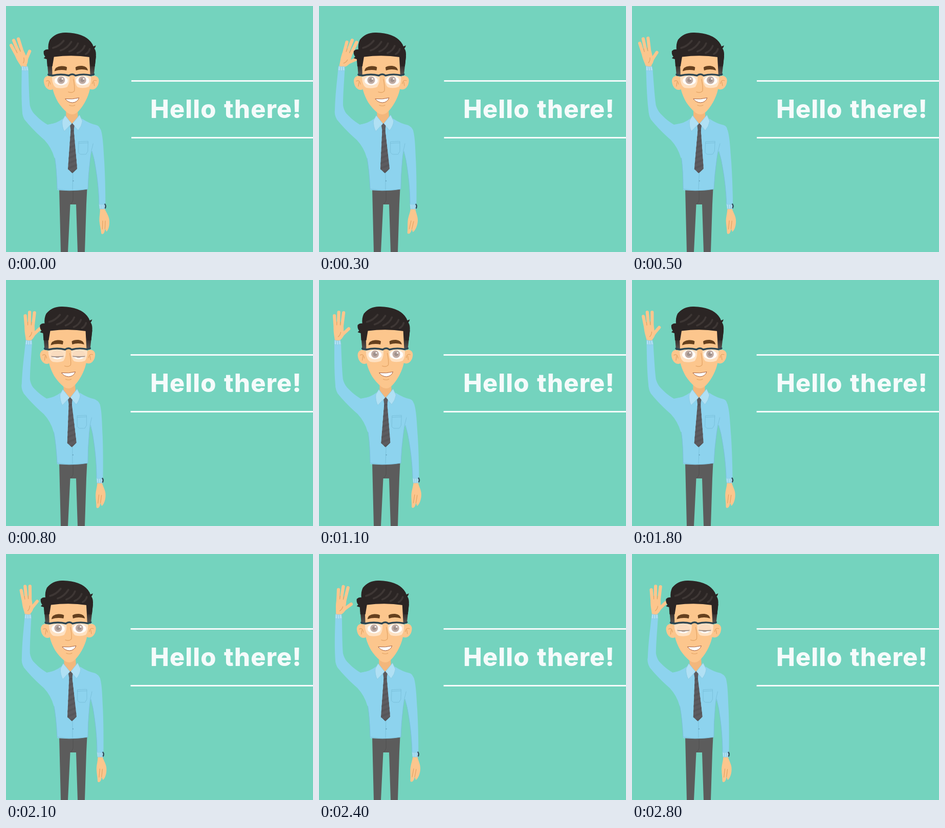
Recreate the animation shown at these times as an HTML page. Size 600 by 481 pixels, loop 2900 ms.

```html
<!DOCTYPE html>
<html lang="en">
<head>
<meta charset="utf-8">
<title>Hello there!</title>
<style>
  html, body { margin: 0; width: 100%; height: 100%; overflow: hidden; background: #74d3be; }
  svg { display: block; width: 600px; height: 481px; }
  text { font: 800 49px Inter, "Open Sans", sans-serif; letter-spacing: 1.1px; fill: #f5fbfb; }
  .skin { fill: #fcc68d; }
  .skinLine { fill: none; stroke: #e2a263; stroke-width: 1.2; stroke-linecap: round; stroke-linejoin: round; }
  .finger { fill: none; stroke: #fcc68d; stroke-width: 6.2; stroke-linecap: round; }
  .shirt { fill: #8dd3ee; }
  .light { fill: #b0e0f4; stroke: #88c9e2; stroke-width: .8; stroke-linejoin: round; }
  .seam { fill: none; stroke: #79bfda; stroke-width: .9; stroke-linecap: round; }
  .hair { fill: #2b2524; }
  .shine { fill: none; stroke: #3e3735; stroke-width: 3.6; stroke-linecap: round; }
  .frame { fill: none; stroke: #2d4652; stroke-width: 3.4; stroke-linecap: round; stroke-linejoin: round; }
</style>
</head>
<body>
<svg viewBox="0 0 600 481">
  <defs>
    <linearGradient id="side" x1="0" y1="0" x2="0" y2="1">
      <stop offset=".35" stop-color="#2b2524"/>
      <stop offset="1" stop-color="#5c5753"/>
    </linearGradient>
    <clipPath id="tieClip"><path id="tieShape" d="M122 234 L126 229 L130.500 234 L129.500 243 L138 318 L129 327 L120 319 L123.500 243 Z"/></clipPath>
    <clipPath id="eyes"><ellipse cx="102" cy="146" rx="13" ry="9"/><ellipse cx="144" cy="146" rx="13" ry="9"/></clipPath>
  </defs>
  <rect width="600" height="481" fill="#74d3be"/>

  <path id="rules" stroke="#f5fbfb" stroke-width="3"/>
  <text x="282" y="219">Hello</text>
  <text x="426" y="219">there!</text>

  <path fill="#5c5c5c" d="M104 357 H158.500 L157 388 L154 481 H140 L137 388 H125.500 L121 481 H107 Z"/>
  <path fill="none" stroke="#505050" d="M131 362 V380 Q130 385 126 387"/>

  <g id="lowArm">
    <g id="lowHand">
      <path class="skin" d="M179.500 394 L188 394 C189 403 194 410 194 419 C194 429 190 438 186.500 441 Q184.500 443 184 439 L183 436 C182 441 180 445 177.500 445.500 Q174 446 174.500 442 C175 435 174 428 174.500 420 C175.500 410 179 404 179.500 394 Z"/>
      <path class="skinLine" d="M183 436 L186 421 M178 436 L181 420"/>
    </g>
    <path class="shirt" d="M160 240 Q178 228 184 243 C188 258 188 278 189.500 305 Q191 340 190.500 389 L178 389 C178 360 175 330 170 300 Q166 285 162 276 Z"/>
    <path class="seam" d="M178 386 C178 360 175 330 170 302 Q168 292 166 284"/>
    <path class="light" d="M178 388 H190.500 L190 397 H179 Z"/>
    <path class="seam" d="M182 389 V396 M186 389 V396"/>
    <path fill="none" stroke="#35505e" stroke-width="2.500" d="M189 387 Q192.500 391 189.500 396"/>
  </g>

  <path id="upArm" class="shirt" d="M31 204 Q39 196 47 203 C57 215 68 225 80 232 L112 226 L112 290 L93.500 297 Q88 277 74 262 Q52 243 35 222 Q30 213 31 204 Z"/>

  <g id="body">
    <path class="shirt" d="M80 232 Q97 229 108 220 L126 216 L146 221 Q160 230 174 233 Q182 236 181 246 C172 258 165 278 163 300 Q160 330 160 358 Q132 363 100 360 C99 338 98 318 94 298 L86 272 Z"/>
    <path class="seam" d="M94 298 Q98 320 100 358 Q132 363 160 358 Q160 330 163 300 Q164 283 168 269 M130 326 V359"/>
    <path class="seam" d="M140 265.500 L158 264.500 V284 L154.500 290 H144 L140 287 Z M140 268.500 L158 267.500"/>
    <circle cx="131" cy="342" r="1.100" fill="#649fba"/>
    <path fill="#f3b77c" d="M113 200 H136 L137 220 L126 231 L114 220 Z"/>
    <path class="light" d="M112 214 L125 230 L111 245 Q106 236 106.500 224 Z M140 213 L126.500 230 L138 243.500 Q145 235 146 225 Z"/>
    <use href="#tieShape" fill="#5d5c60"/>
    <g clip-path="url(#tieClip)"><path id="stripes" stroke="#57565a" stroke-width="4"/></g>
    <path fill="none" stroke="#4d4c50" stroke-width=".8" d="M123.500 243 Q126 244.500 129.500 243"/>
  </g>

  <g id="hand">
    <path class="skin" d="M-5 3 C-5 -8 -9 -18 -8 -29 Q-5 -35 2 -34 L11 -32 C12 -26 11 -21 12 -18 L14 -17 Q10 -7 5.500 -4 L5 3 Z"/>
    <path class="finger" d="M-5 -28 L-7 -51 M1 -31 L1.500 -58 M8 -30 L11 -57 M8 -13 Q15 -20 21.500 -26"/>
    <path class="skinLine" d="M-2 -33 V-39 M5 -33 L5.500 -39 M6 -19 Q5 -13 1 -10"/>
  </g>
  <g id="forearm">
    <path class="shirt" d="M37.500 125 L50.500 125 C49 150 47 175 47 194 Q48 202 53 210 L36 222 Q30 213 31 204 C32 172 35 150 37.500 125 Z"/>
    <path class="light" d="M38.500 117.500 Q44 119.500 50 118 L50.500 126 Q44 127.500 37.500 126 Z"/>
    <path class="seam" d="M42 119.500 V125.500 M46 119.500 V125.500"/>
  </g>

  <g id="head">
    <path class="skin" d="M86 141 C77 132 66 138 68.500 150 C70 160 79 168 87 162 Z M157 141 C166 132 178 137 175.500 149 C174 160 165 167 156 161 Z"/>
    <path class="skinLine" d="M73 147 Q79 143 81 153 M78 149 L77 157 M171 146 Q165 143 163 152 M166 149 L167 156"/>
    <path class="skin" d="M82 96 H161 L160 148 C159 165 155 176 148 189 Q141 201 134 207.500 Q124 216 114 208.500 Q103 199 96 188 C88 174 84 160 83 145 Z"/>
    <path fill="url(#side)" d="M74 98 H88 L84 110 L85 137 H77 Z M157 98 H170 L166 136 H159 Z"/>
    <path class="hair" d="M75 118 L74 104 Q70 103 68 102 L71 99 Q67 95 68 88 Q72 84 77 85 Q76 74 80 66 Q92 51 112 52 Q146 53 160 70 Q164 75 165 79 Q168 78 170 77 Q169 81 167 83 Q171 88 170 100 L168 118 L160 118 L158 100 Q124 95 88 99.500 L85 118 Z"/>
    <path class="shine" d="M86 82 Q98 79 107 68 M101 87 Q114 83 122 70 M118 89 Q131 84 135 73 M134 92 Q145 87 148 78 M150 94 Q156 91 158 84"/>
    <path fill="#65401e" d="M89 127.500 Q90 118.500 102 117.500 Q111 117 113.500 120 L112.500 126 Q100 123.500 89 127.500 Z M130 120 Q134 116.500 143 117 Q153 118 154.500 126 Q142 122 131 126 Z"/>

    <g clip-path="url(#eyes)">
      <rect x="86" y="132" width="76" height="28" fill="#fffaf6"/>
      <g id="irises"></g>
      <path id="lids" fill="#f3bd88" stroke="#5a3c2a" stroke-width="2"/>
    </g>
    <path fill="#fff" fill-opacity=".46" d="M84 135 H118 Q120 149 114 158 Q106 162 93 160 Q84 156 84 135 Z M129 135 H160 Q162 150 156 158 Q146 162 135 159 Q128 154 129 135 Z"/>
    <path class="frame" d="M77 134 L85 136 Q102 132 117 136 Q124 131 130 136 Q145 132 160 135.500 L166 133.500"/>
    <path class="skinLine" d="M126 143 Q129 158 128 166 Q124 171 116 168"/>
    <path fill="#fff" stroke="#a8603f" stroke-width="1" d="M110 181.500 Q124 183 137 179.500 Q134 188.500 124 189 Q115 188.500 110 181.500 Z"/>
    <path class="skinLine" d="M118 194 Q124 196.500 129 194"/>
  </g>
</svg>
<script>
const LOOP = 2900, STEP = 100, WAVE = 2000 / 3, BLINK = 2000;
const $ = id => document.getElementById(id);
const move = (id, value) => $(id).setAttribute("transform", value);
const swing = (t, peak) => Math.cos((t - peak) / WAVE * 2 * Math.PI);
// Horizontal shear that leaves the row y in place, then a shift
const shear = (k, y, dx = 0) => `matrix(1 0 ${-k} 1 ${k * y + dx} 0)`;

$("stripes").setAttribute("d", Array.from({ length: 9 }, (_, i) => `M115 ${250 + i * 10} l28 -12`).join(""));
$("irises").innerHTML = [102, 143.5].map(x =>
  `<circle cx="${x}" cy="145" r="7.500" fill="#8a6657"/>
   <circle cx="${x}" cy="145" r="3.800" fill="#4d332b"/>
   <circle cx="${x + 2.5}" cy="142.500" r="1.600" fill="#fff"/>`).join("");

function draw(t) {
  const lean = 6.5 * (0.57 - swing(t, 200));
  const elbow = lean * 0.2;
  const wrist = 39.5 + 6.5 * swing(t, 210);
  const tilt = -3 + 23 * swing(t, 285);

  move("head", `translate(${lean} 0)`);
  move("body", shear(lean * 0.0044, 360));
  move("upArm", `translate(${elbow} 0)`);
  move("forearm", shear((wrist - 44 - elbow) / 88, 210, elbow));
  move("hand", `translate(${wrist} 121) rotate(${tilt})`);
  move("lowArm", `translate(${lean * 0.3} 0) rotate(${-lean * 0.15} 175 245)`);
  move("lowHand", `rotate(${5 * swing(t, 320) - 3} 184 394)`);

  const lid = Math.max(0, 1 - Math.abs(t % BLINK - 800) / 150);
  const y = 132 + 17 * lid;
  $("lids").setAttribute("d", `M84 125 H164 V${y} Q146 ${y + 2} 128 ${y} H120 Q102 ${y + 2} 84 ${y} Z`);

  const x = 245 - 1.5 * Math.min(1, t / 700);
  $("rules").setAttribute("d", `M${x} 146.5 H600 M${x} 257.5 H600`);
}

function tick() {
  draw(Math.floor(performance.now() % LOOP / STEP) * STEP);
  requestAnimationFrame(tick);
}
tick();
</script>
</body>
</html>
```
